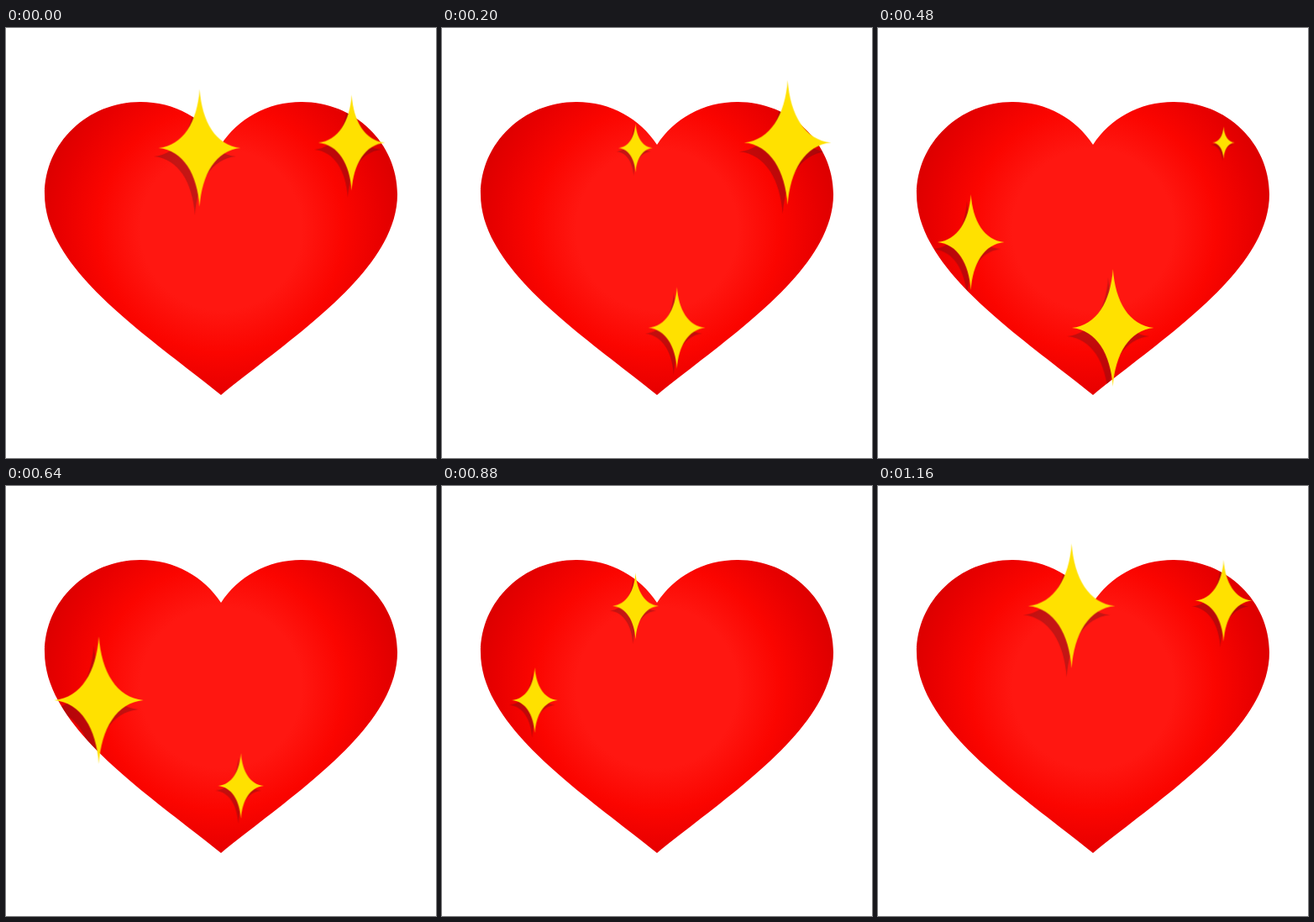
These frames come from a looping animation (512x512 px, 1.2 s). An HTML page:

```html
<!DOCTYPE html>
<html lang="en">
<head>
<meta charset="utf-8">
<title>Sparkling heart</title>
<style>
  html, body { margin: 0; width: 100%; height: 100%; overflow: hidden; background: #fff; }
  svg { display: block; width: 100%; height: 100%; }
  .star { fill: #ffe100; }
  .shade { fill: #3c141e; fill-opacity: .3; }
  .pulse {
    transform-origin: 0 0;
    animation: twinkle 1200ms infinite;
    animation-delay: var(--delay);
  }
  .a { --delay: -480ms; }
  .b { --delay: -240ms; }
  .c { --delay: 0ms; }
  .d { --delay: -960ms; }
  @keyframes twinkle {
    0% { transform: scale(0); animation-timing-function: cubic-bezier(.167, .167, .667, 1); }
    33.3333% { transform: scale(1); animation-timing-function: cubic-bezier(.333, 0, .833, .833); }
    66.6667%, 100% { transform: scale(0); }
  }
</style>
</head>
<body>
<svg viewBox="0 0 512 512">
  <defs>
    <radialGradient id="red" gradientUnits="userSpaceOnUse" cx="256" cy="240" r="240">
      <stop offset=".4" stop-color="#ff1711"/>
      <stop offset=".61" stop-color="#fb0500"/>
      <stop offset=".8" stop-color="#e80000"/>
      <stop offset="1" stop-color="#d20000"/>
    </radialGradient>
    <path id="heart" d="M256 437 C170 367 46 288 46 198 C46 137 97 88 160 88 C201 88 236 108 256 139
      C276 108 311 88 352 88 C415 88 466 137 466 198 C466 288 342 367 256 437Z"/>
    <clipPath id="inside"><use href="#heart"/></clipPath>
    <path id="star" d="M0 -76 C3 -34 21 -3 53 0 C21 3 3 34 0 76 C-3 34 -21 3 -53 0 C-21 -3 -3 -34 0 -76Z"/>
  </defs>

  <use href="#heart" fill="url(#red)"/>

  <g class="shade" clip-path="url(#inside)">
    <g transform="translate(230.5 142.8)"><use class="pulse a" href="#star" x="-6" y="11"/></g>
    <g transform="translate(411.5 136.5)"><use class="pulse b" href="#star" x="-6" y="11"/></g>
    <g transform="translate(279.7 357)"><use class="pulse c" href="#star" x="-6" y="11"/></g>
    <g transform="translate(110.5 255)"><use class="pulse d" href="#star" x="-6" y="11"/></g>
  </g>

  <g class="star">
    <g transform="translate(230.5 142.8)"><use class="pulse a" href="#star"/></g>
    <g transform="translate(411.5 136.5)"><use class="pulse b" href="#star"/></g>
    <g transform="translate(279.7 357)"><use class="pulse c" href="#star"/></g>
    <g transform="translate(110.5 255)"><use class="pulse d" href="#star"/></g>
  </g>
</svg>
</body>
</html>
```
